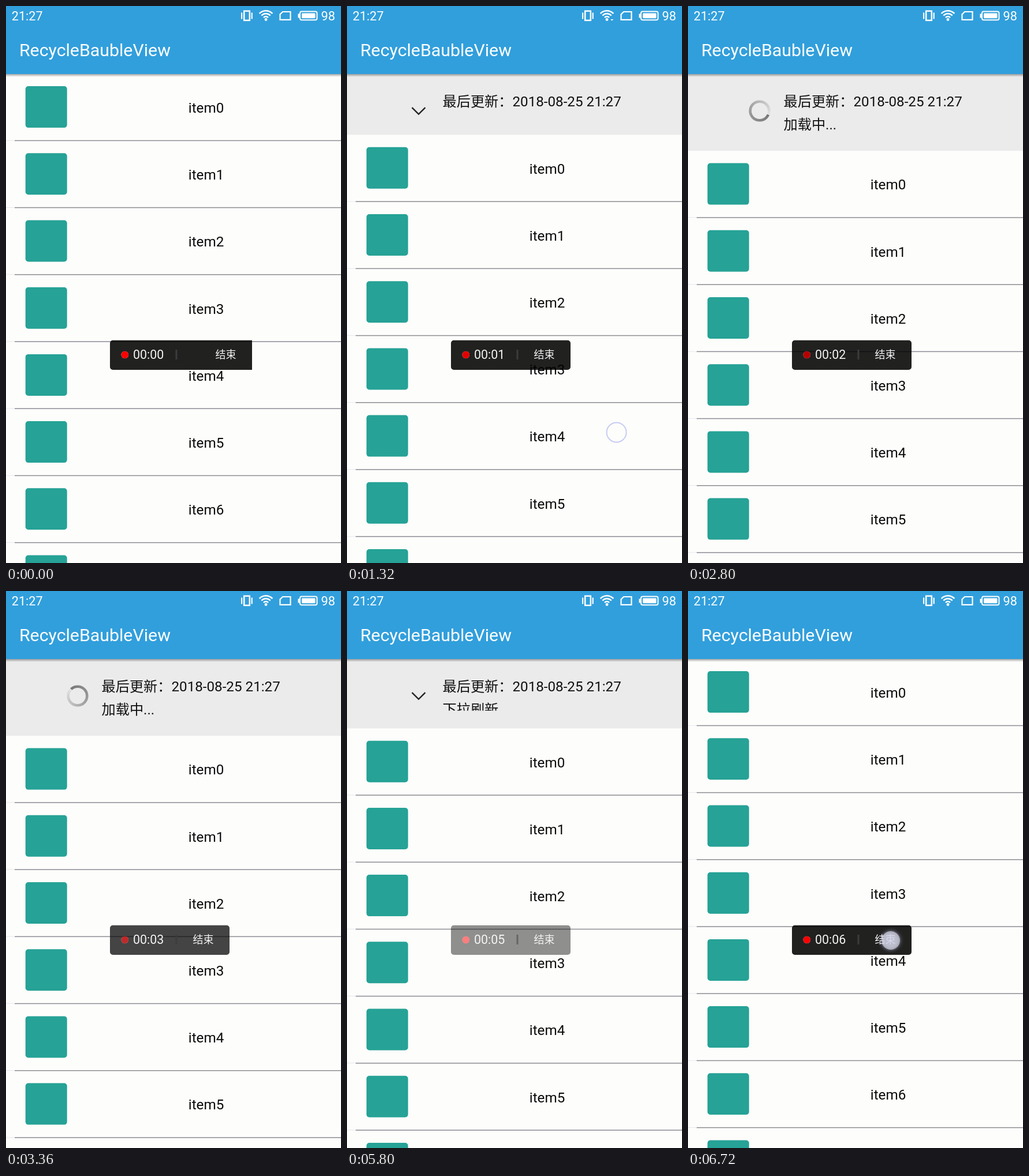
An HTML page with a canvas for the animation above (6.76 s loop, 580 by 966 pixels).

```html
<!DOCTYPE html>
<html lang="zh">
<head>
<meta charset="utf-8">
<style>
html, body { margin: 0; width: 580px; height: 966px; overflow: hidden; }
canvas { display: block; }
</style>
</head>
<body>
<canvas id="stage" width="580" height="966"></canvas>
<script>
const ctx = document.getElementById('stage').getContext('2d');
const LOOP = 6760, BAR = 118, ROW = 116.2, HEADER = 133.5;
const TOUCH = 600, RELEASE = 2060, LOADING = 2260, DONE = 4750, CLOSE = 5610;
const FONT = 'Roboto, "Noto Sans CJK SC", "Noto Sans CJK", sans-serif';

const span = (t, start, length) => Math.min(1, Math.max(0, (t - start) / length));
const mix = (a, b, p) => a + (b - a) * p;
const smooth = p => (1 - Math.cos(Math.PI * p)) / 2;

function rect(x, y, w, h, color) {
  ctx.fillStyle = color;
  ctx.fillRect(x, y, w, h);
}
function round(x, y, w, h, r, color) {
  ctx.fillStyle = color;
  ctx.beginPath();
  ctx.roundRect(x, y, w, h, r);
  ctx.fill();
}
function disc(x, y, r, color) {
  ctx.fillStyle = color;
  ctx.beginPath();
  ctx.arc(x, y, r, 0, 7);
  ctx.fill();
}
function text(s, x, y, size, color) {
  ctx.font = size + 'px ' + FONT;
  ctx.fillStyle = color;
  ctx.fillText(s, x, y);
}
function line(points, color, width) {
  ctx.strokeStyle = color;
  ctx.lineWidth = width;
  ctx.beginPath();
  points.forEach(([x, y]) => ctx.lineTo(x, y));
  ctx.stroke();
}
function layer(alpha, draw) {
  ctx.save();
  ctx.globalAlpha = alpha;
  draw();
  ctx.restore();
}

const travel = t => 446.6 * (1 - (1 - span(t, TOUCH, RELEASE - TOUCH)) ** 1.63);

// Pull distance: damped drag, settle, then scroll closed
function pull(t) {
  const dragged = 338.6 * (1 - Math.exp(-travel(t) / 800));
  const open = mix(dragged, HEADER, smooth(span(t, RELEASE, 200)));
  return open * (1 - smooth(span(t, CLOSE, 950)));
}

function statusBar(t) {
  const white = '#fff';
  text('21:27', 9.8, 24.5, 21.6, white);
  text('98', 545.5, 24.5, 21.6, white);
  ctx.strokeStyle = white;
  ctx.lineWidth = 2.5;
  ctx.strokeRect(412.2, 8.7, 9.6, 16.2);
  rect(407, 11.5, 2.2, 11, white);
  rect(424.6, 11.5, 2.2, 11, white);

  for (const r of [5.5, 10.5, 15.5]) {
    ctx.beginPath();
    ctx.arc(450, 23.8, r, -Math.PI * 0.76, -Math.PI * 0.24);
    ctx.stroke();
  }
  disc(450, 23.5, 2.4, white);
  const tip = t > 900 && t < 1500 ? 25.5 : t > 1700 && t < 2200 ? 20.5 : 0;
  if (tip) {
    ctx.beginPath();
    ctx.moveTo(456, 23);
    ctx.lineTo(461.5, 23);
    ctx.lineTo(458.7, tip);
    ctx.fill();
  }

  line([[474.5, 14.5], [479, 10], [492.5, 10], [492.5, 23.8], [474.5, 23.8], [474.5, 13.5]], white, 2.2);
  ctx.lineWidth = 2;
  ctx.beginPath();
  ctx.roundRect(509, 9.5, 29.5, 14.8, 3);
  ctx.stroke();
  round(512, 12.5, 23.5, 8.8, 1, white);
  rect(505.5, 13.5, 2.5, 7, white);
}

function appBar(t) {
  const shade = ctx.createLinearGradient(0, BAR, 0, BAR + 5);
  shade.addColorStop(0, 'rgba(0,0,0,.34)');
  shade.addColorStop(1, 'rgba(0,0,0,0)');
  rect(0, BAR, 580, 5, shade);
  rect(0, 0, 580, BAR, '#319fdc');
  text('RecycleBaubleView', 22.9, 87, 30.3, '#fff');
  statusBar(t);
}

function spinner(x, y, t) {
  const turn = (t - 3360) / 1000 * 2 * Math.PI;
  const tint = ctx.createConicGradient(turn - Math.PI * 0.75, x, y);
  tint.addColorStop(0, '#777');
  tint.addColorStop(0.5, '#a2a2a2');
  tint.addColorStop(1, '#e2e2e2');
  ctx.strokeStyle = tint;
  ctx.lineWidth = 4.6;
  ctx.beginPath();
  ctx.arc(x, y, 16.3, 0, 7);
  ctx.stroke();
}

function header(t, offset) {
  const shift = Math.max(0, offset - HEADER);
  ctx.save();
  ctx.beginPath();
  ctx.rect(0, BAR, 580, Math.max(0, offset - 31));
  ctx.clip();
  ctx.translate(0, shift);
  const status = t < 1860 ? '下拉刷新...' : t < LOADING ? '释放更新...'
    : t < DONE ? '加载中...' : t < 5540 ? '更新完成...' : '下拉刷新...';
  text('最后更新：2018-08-25 21:27', 165.5, 174, 24.2, '#111');
  text(status, 165.5, 214, 24.2, '#111');
  if (t > LOADING && t < DONE) {
    spinner(124, 182, t);
  } else {
    const flip = t < LOADING ? 1 - 2 * span(t, 1860, 200) : 2 * span(t, DONE, 200) - 1;
    ctx.translate(124, 182);
    ctx.scale(1, flip || 0.04);
    line([[-11.5, -5.8], [0, 5.5], [11.5, -5.8]], '#222', 2.4);
  }
  ctx.restore();
}

function list(t, offset) {
  const top = BAR - 0.4 + offset;
  const alpha = 1 - 0.36 * Math.sin(Math.PI * span(t, DONE + 10, 250));
  if (alpha < 1) rect(15, top, 565, 1.2, '#bbb');
  layer(alpha, () => rect(0, top, 580, 966 - top, '#fdfdfb'));
  for (let i = 0; i < 8; i++) {
    const y = top + i * ROW;
    layer(alpha, () => {
      round(33.7, y + 21.5, 72, 72, 5, '#26a296');
      text('item' + i, 315.8, y + 67.3, 24.2, '#0a0a0a');
    });
    rect(0, y + 115.2, 15, 1, '#e8e8ee');
    rect(15, y + 115.1, 565, 1.5, '#8c8c94');
  }
}

function recorder(t) {
  const shrink = 39 * (1 - smooth(span(t, 0, 240)));
  const dim = t > 6500 ? mix(0.5, 1, span(t, 6560, 100)) : mix(1, 0.5, span(t, 3200, 500));
  const pulse = 0.85 + 0.15 * Math.cos(t / 6400 * 2 * Math.PI);
  const seconds = Math.max(0, Math.floor((t - 100) / 1000));
  layer(dim, () => {
    // The panel leaves a hole for the dot, so both fade as one
    ctx.fillStyle = 'rgba(0,0,0,.87)';
    ctx.beginPath();
    ctx.roundRect(180, 579.7, 207 + shrink, 51.3, shrink > 1 ? [5, 0, 0, 5] : 5);
    ctx.moveTo(212, 605);
    ctx.arc(205.8, 605, 6.2, 0, 2 * Math.PI);
    ctx.fill('evenodd');
    disc(205.8, 605, 6.2, `rgb(${255 * pulse}, 0, 0)`);
    rect(293.5, 596, 3, 17, '#3c3c3c');
  });
  text('00:0' + seconds, 220, 612, 21.4, '#f4f4f4');
  text('结束', 323.5 + shrink, 611, 18, '#f4f4f4');
}

function touch(t) {
  if (t > TOUCH && t < RELEASE + 80) {
    const d = travel(t);
    layer(1 - span(t, RELEASE, 80), () => {
      ctx.strokeStyle = 'rgba(135,145,235,.45)';
      ctx.lineWidth = 2;
      ctx.beginPath();
      ctx.arc(513 - 0.155 * d, 440 + d, 17, 0, 7);
      ctx.stroke();
    });
  }
  if (t > 6600) {
    layer(span(t, 6600, 80), () => {
      ctx.shadowColor = '#c8ccff';
      ctx.shadowBlur = 6;
      disc(351, 606, 16, 'rgba(215,215,222,.65)');
    });
  }
}

function frame(now) {
  const t = now % LOOP;
  const offset = pull(t);
  rect(0, 0, 580, 966, '#ebebeb');
  header(t, offset);
  list(t, offset);
  appBar(t);
  recorder(t);
  touch(t);
  requestAnimationFrame(frame);
}
requestAnimationFrame(frame);
</script>
</body>
</html>
```
